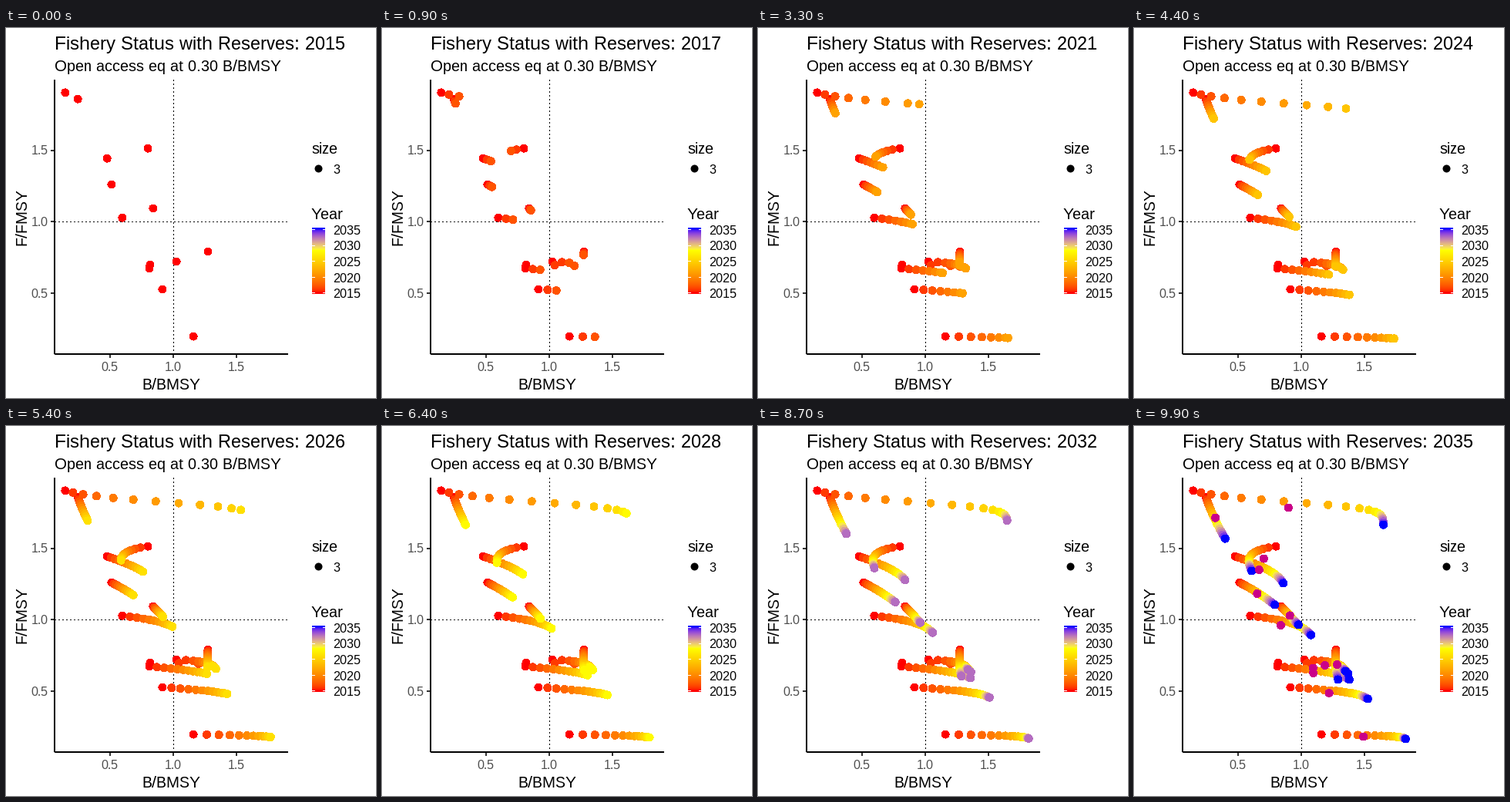
These frames come from a looping animation (480x480 px, 10000 ms). A matplotlib script:

```python
import numpy as np
import matplotlib.pyplot as plt
from matplotlib.animation import FuncAnimation

plt.rcParams["font.family"] = "Liberation Sans"
plt.rcParams["text.hinting"] = "native"
plt.rcParams["text.hinting_factor"] = 1
SIZE, DPI = 480, 72
FRAMES, INTERVAL = 100, 100
FIRST, YEARS = 2015, 21

# Frames on which the points are halfway to the next year
STEPS = [*range(3, 84, 5), *range(87, 100, 4)]

# Stocks: first biomass, first and last fishing rate, growth rate and,
# where fishing does not set it, the biomass the stock tends to
STOCKS = [
    (0.150, 1.902, 1.664, 0.44, 1.65),
    (0.248, 1.858, 1.567, 0.033, 1.2),
    (0.479, 1.443, 1.255, 0.14, 0.9),
    (0.801, 1.513, 1.341, 0.115),
    (0.515, 1.260, 1.104, 0.112),
    (0.600, 1.028, 0.893, 0.26),
    (0.843, 1.093, 0.964, 0.12),
    (0.819, 0.699, 0.624, 0.745),
    (0.813, 0.673, 0.581, 0.19),
    (1.026, 0.721, 0.640, 0.37),
    (1.275, 0.791, 0.581, 0.025),
    (0.916, 0.527, 0.446, 0.21),
    (1.160, 0.198, 0.166, 0.255),
]

# Linear RGB to XYZ scaled by the D65 white point
TO_XYZ = np.array([[0.4124, 0.3576, 0.1805],
                   [0.2126, 0.7152, 0.0722],
                   [0.0193, 0.1192, 0.9505]])
TO_XYZ /= TO_XYZ.sum(axis=1, keepdims=True)
STOPS = np.array([[255, 0, 0], [255, 165, 0], [255, 255, 0], [0, 0, 255]]) / 255


def to_lab(rgb):
    """Cube-rooted XYZ: linear in Lab, so mixing in it is mixing in Lab."""
    lin = np.where(rgb <= 0.04045, rgb / 12.92, ((rgb + 0.055) / 1.055) ** 2.4)
    xyz = lin @ TO_XYZ.T
    return np.where(xyz > 0.008856, np.cbrt(xyz), 7.787 * xyz + 16 / 116)


def to_rgb(lab):
    xyz = np.where(lab > 0.2069, lab ** 3, (lab - 16 / 116) / 7.787)
    lin = np.clip(xyz @ np.linalg.inv(TO_XYZ).T, 0, 1)
    return np.where(lin <= 0.0031308, lin * 12.92,
                    1.055 * lin ** (1 / 2.4) - 0.055)


def ramp(share):
    """Colours along the year scale, from 0 to 1."""
    pos = np.asarray(share) * (len(STOPS) - 1)
    return np.column_stack([np.interp(pos, range(len(STOPS)), channel)
                            for channel in to_lab(STOPS).T])


def px(b):
    return 52.25 + 164.5 * b


def py(f):
    return 436.75 - 185.5 * f


def project(b, first, last, growth, level=None):
    """Yearly logistic growth under slowly falling fishing."""
    path = []
    for f in np.geomspace(first, last, YEARS):
        path.append((px(b), py(f)))
        b += growth * b * (1 - b / (level or 2 - f))
    return path


paths = np.array([project(*stock) for stock in STOCKS]).swapaxes(0, 1)
labs = ramp(np.linspace(0, 1, YEARS))

fig = plt.figure(figsize=(SIZE / DPI, SIZE / DPI), dpi=DPI, facecolor="white")
ax = fig.add_axes([0, 0, 1, 1])
ax.axis("off")


def line(xs, ys, color="black", width=1, **kw):
    ax.plot(xs, ys, color=color, lw=width, solid_capstyle="butt",
            antialiased=False, **kw)


def text(x, y, label, size, color="black", **kw):
    return ax.text(x, y, label, fontsize=size, color=color, **kw)


# Panel
dots = dict(linestyle=(0, (1, 3)), dash_capstyle="butt", zorder=1)
line([px(1), px(1)], [67, 422], **dots)
line([63, 366], [py(1), py(1)], **dots)
line([63, 63], [67, 423], width=2, zorder=4)
line([63, 366], [423, 423], width=2, zorder=4)
GREY, TICK = "#4d4d4d", "#333333"
for value in (0.5, 1.0, 1.5):
    x, y = px(value), py(value)
    line([58, 62], [y, y], color=TICK, width=2)
    line([x, x], [424, 428], color=TICK, width=2)
    text(54.5, y + 6, f"{value}", 16, GREY, ha="right")
    text(x, 445, f"{value}", 16, GREY, ha="center")

title = text(63, 28, "", 24)
text(63, 56, "Open access eq at 0.30 B/BMSY", 20)
text(214.5, 469, "B/BMSY", 20, ha="center")
text(26, 244.5, "F/FMSY", 20, rotation=90, rotation_mode="anchor", ha="center")

# Legends
DOT = 10 ** 2
text(396, 163, "size", 20)
ax.scatter([405], [182], s=DOT, c="black", lw=0, antialiased=False)
text(424, 189, "3", 16)
text(396, 248, "Year", 20)
TOP, BOTTOM = 261, 343
rows = np.arange(259, 345) + 0.5
share = np.clip((BOTTOM - rows) / (BOTTOM - TOP), 0, 1)
ax.imshow(to_rgb(ramp(share))[:, None, :], aspect="auto",
          extent=(397, 414, 345, 259), interpolation="nearest")
for k, y in enumerate(np.linspace(BOTTOM, TOP, 5)):
    line([397, 400], [y, y], color="white")
    line([411, 414], [y, y], color="white")
    text(424, y + 7, str(FIRST + 5 * k), 16)
ax.set_xlim(0, SIZE)
ax.set_ylim(SIZE, 0)

points = ax.scatter([], [], s=DOT, lw=0, antialiased=False, zorder=3)


def draw(n):
    year = sum(step < n for step in STEPS)
    spots, shades = paths[:year + 1], labs[:year + 1]
    if n in STEPS:
        after = (year + 1) % YEARS
        spots = np.concatenate([spots, [(paths[year] + paths[after]) / 2]])
        shades = np.concatenate([shades, [(labs[year] + labs[after]) / 2]])
    points.set_offsets(spots.reshape(-1, 2))
    points.set_facecolors(np.repeat(to_rgb(shades), len(STOCKS), axis=0))
    title.set_text(f"Fishery Status with Reserves: {FIRST + year}")
    return points, title


anim = FuncAnimation(fig, draw, frames=FRAMES, interval=INTERVAL,
                     init_func=lambda: draw(0), repeat=True, repeat_delay=0)
plt.show()
```
